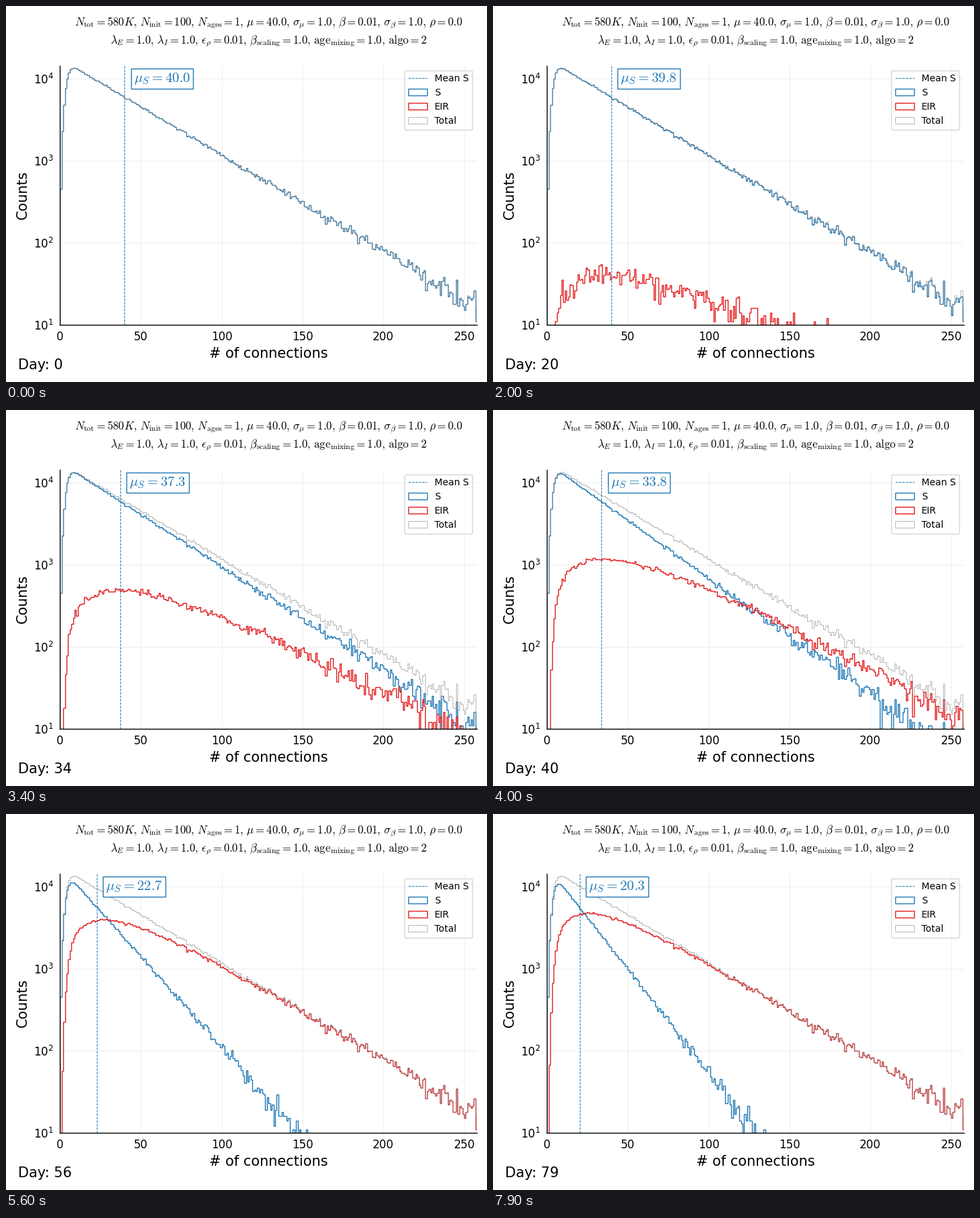
Recreate the animation shown at these times as a matplotlib script. Size 715 by 559 pixels, loop 8 s.

```python
import matplotlib.pyplot as plt
import numpy as np
from matplotlib.animation import FuncAnimation
from matplotlib.patches import Patch

W, H, DPI = 715, 559, 100
LEFT, BOTTOM, AX_W, AX_H = 80.3, 85.3, 620, 385
DAYS, STEP_MS = 80, 100
BLUE, RED, GREY = "#1f78b4", "#e31a1c", "#808080"
XMAX, SCALE = 258, 37.0

plt.rcParams.update({"font.family": "DejaVu Sans", "mathtext.fontset": "cm"})
rng = np.random.default_rng(7)


def degree_counts():
    """People per number of connections: exponential decay, soft start."""
    k = np.arange(XMAX + 1)
    soft_start = 1 - np.exp(-0.0465 * (k + 0.75) ** 2)
    return rng.poisson(17200 * np.exp(-k / SCALE) * soft_start)


total = degree_counts()
# each person is infected once exposure passes a random threshold
degree = np.repeat(np.arange(total.size), total)
with np.errstate(divide="ignore"):
    threshold = rng.exponential(size=degree.size) / degree


def exposure(day):
    """Infection pressure per connection so far, a skewed logistic."""
    u = day - 49
    return 0.0311 / (1 + np.exp(-(0.168 * u - 0.00034 * u * u)))


def mean_susceptible(pressure):
    return 3 + 1 / (1 / SCALE + pressure)


fig = plt.figure(figsize=(W / DPI, H / DPI), dpi=DPI, facecolor="white")
ax = fig.add_axes([LEFT / W, BOTTOM / H, AX_W / W, AX_H / H])
ax.set_yscale("log")
ax.set_xlim(0, XMAX)
ax.set_ylim(10, 14300)
ax.set_xticks(range(0, 251, 50))
ax.tick_params(which="both", length=0, pad=7, labelsize=12)
ax.set_xlabel("# of connections", fontsize=15)
ax.set_ylabel("Counts", fontsize=15)
ax.set_axisbelow(True)
ax.grid(color="#b0b0b0", lw=0.8, alpha=0.2)
ax.spines[["top", "right"]].set_visible(False)
ax.spines[["left", "bottom"]].set_linewidth(1)


def px_text(x, y, s, size, **kw):
    return fig.text(x / W, 1 - y / H, s, fontsize=size, va="baseline", **kw)


def math_line(y, *terms):
    px_text(LEFT + AX_W / 2 + 0.5, y, "$" + r",\,".join(terms) + "$", 12,
            ha="center")


math_line(29.5, r"N_\mathrm{tot}=580K", r"N_\mathrm{init}=100",
          r"N_\mathrm{ages}=1", r"\mu=40.0", r"\sigma_\mu=1.0",
          r"\beta=0.01", r"\sigma_\beta=1.0", r"\rho=0.0")
math_line(55.8, r"\lambda_E=1.0", r"\lambda_I=1.0", r"\epsilon_\rho=0.01",
          r"\beta_\mathrm{scaling}=1.0",
          r"\mathrm{age}_\mathrm{mixing}=1.0", r"\mathrm{algo}=2")
day_text = px_text(18, 540.5, "", 15)


def steps(color, lw):
    return ax.stairs(total, np.arange(XMAX + 2), baseline=0.1,
                     color=color, lw=lw)


styles = {"S": (BLUE, 1), "EIR": (RED, 1), "Total": (GREY, 0.4)}
hists = {name: steps(*style) for name, style in styles.items()}
mean_line = ax.axvline(40, color=BLUE, lw=0.7, ls="--", label="Mean S")
mean_text = ax.text(0, 0.95, "", transform=ax.get_xaxis_transform(),
                    color=BLUE, fontsize=15, ha="left", va="center",
                    bbox=dict(boxstyle="square,pad=0.2", fc="white",
                              ec=BLUE, lw=1))

boxes = [Patch(fill=False, ec=color, lw=lw, label=name)
         for name, (color, lw) in styles.items()]
ax.legend(handles=[mean_line, *boxes], loc="upper right", fontsize=10)


def update(day):
    pressure = exposure(day)
    eir = np.bincount(degree[threshold < pressure], minlength=total.size)
    hists["S"].set_data(np.maximum(total - eir, 0.1))
    hists["EIR"].set_data(np.maximum(eir, 0.1))
    mu = mean_susceptible(pressure)
    mean_line.set_xdata([mu, mu])
    mean_text.set_x(mu + 5.52)
    mean_text.set_text(rf"$\mu_S = {mu:.1f}$")
    day_text.set_text(f"Day: {day}")
    return [*hists.values(), mean_line, mean_text, day_text]


anim = FuncAnimation(fig, update, frames=DAYS, interval=STEP_MS,
                     repeat=True, blit=False)
plt.show()
```
